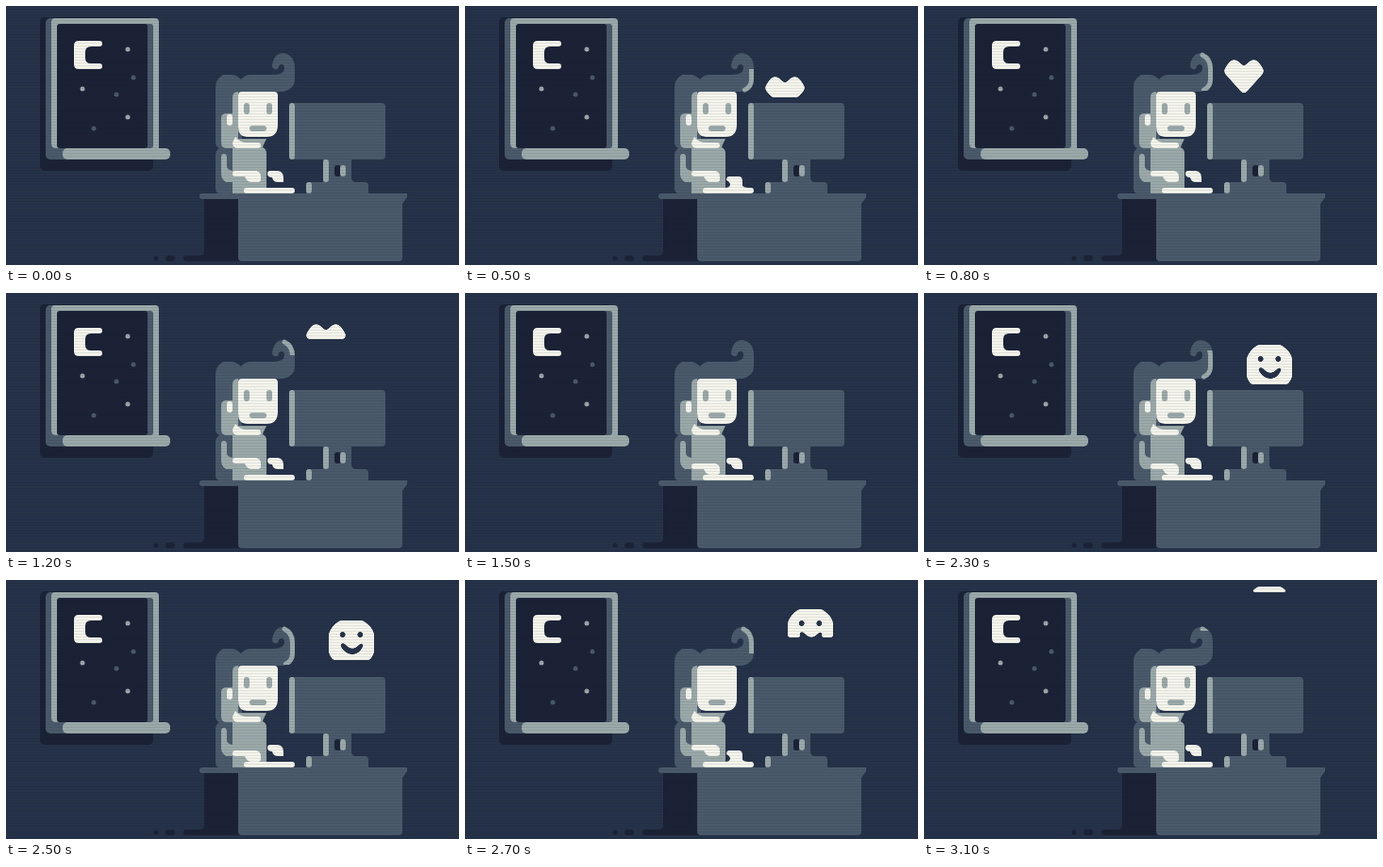
Write an HTML page that moves like this. It is 480 by 275 pixels and loops after 3200 ms.

```html
<!DOCTYPE html>
<html lang="en">
<head>
<meta charset="utf-8">
<title>Late night at the desk</title>
<style>
  html, body { margin: 0; width: 100%; height: 100%; overflow: hidden; background: #253248; }
  svg { display: block; width: 100vw; height: 100vh; }
  .dark { fill: #1b2236; }
  .mid { fill: #4a5a6b; }
  .light { fill: #9ba9a9; }
  .white { fill: #f5f5ec; }
</style>
</head>
<body>
<svg viewBox="0 0 480 275" preserveAspectRatio="none">
  <defs>
    <filter id="goo" filterUnits="userSpaceOnUse" x="300" y="0" width="110" height="110" color-interpolation-filters="sRGB">
      <feGaussianBlur stdDeviation="1.5" result="soft"/>
      <feComponentTransfer in="soft" result="edge">
        <feFuncA type="linear" slope="6" intercept="-2.5"/>
      </feComponentTransfer>
      <feFlood flood-color="#f5f5ec"/>
      <feComposite operator="in" in2="edge"/>
    </filter>
    <clipPath id="reveal"><rect id="revealBox" x="300" y="-60" width="110" height="157"/></clipPath>
    <clipPath id="glow"><rect id="glowBox" x="285" width="30" height="41"/></clipPath>
    <pattern id="lines" width="3" height="3" patternUnits="userSpaceOnUse">
      <rect width="3" height="1" fill="#10182c" opacity=".09"/>
    </pattern>
  </defs>

  <rect width="480" height="275" fill="#253248"/>

  <!-- window -->
  <rect class="dark" x="36" y="12" width="120" height="163" rx="5"/>
  <rect class="mid" x="42" y="13" width="116" height="150" rx="5"/>
  <rect class="light" x="48" y="13" width="114" height="146" rx="4"/>
  <path class="mid" d="M48 146q0 5 5 5h18v12H48z"/>
  <rect class="mid" x="140" y="19" width="16" height="132" rx="3"/>
  <rect class="dark" x="54" y="19" width="96" height="132" rx="3"/>
  <rect class="light" x="60" y="151" width="114" height="12" rx="5"/>
  <path class="white" d="M77 37H99a3 3 0 0 1 0 6H90q-6 0-6 6v6q0 6 6 6h9a3 3 0 0 1 0 6H77q-5 0-5-5V42q0-5 5-5z"/>
  <g id="stars"></g>

  <!-- desk -->
  <path class="dark" d="M210 204h40v67H191a3 3 0 0 1 0-6h14q5 0 5-5z"/>
  <rect class="dark" x="169" y="265" width="10" height="6" rx="3"/>
  <circle class="dark" cx="159" cy="268" r="2.5"/>
  <path class="mid" d="M208 199H425v4l-5 7v57q0 4-4 4H250q-4 0-4-4V205H208a3 3 0 0 1 0-6z"/>

  <!-- monitor -->
  <rect class="mid" x="300" y="103" width="102" height="60" rx="4"/>
  <rect class="light" x="300" y="103" width="6" height="60" rx="3"/>
  <path class="mid" d="M336 162h30v20q0 5 5 5h9q4 0 4 4v8H318v-8q0-4 4-4h14z"/>
  <rect class="light" x="336" y="163" width="6" height="24" rx="3"/>
  <rect class="light" x="318" y="187" width="6" height="12" rx="3"/>
  <rect class="dark" x="348" y="169" width="7" height="12" rx="3"/>
  <rect class="light" x="354" y="169" width="6" height="12" rx="3"/>

  <!-- person -->
  <path class="mid" d="M222 86q0-8 8-13h9q5 0 10 5q4-5 10-5h24q12 0 12-7q0-4-3-4q-3 0-4 5q-6 1-6-4q2-13 12-13q12 2 12 16v12q0 10-12 13H250v60q-2 20-4 48H227q-5 0-5-5V158q0-4 4-7q-4-2-4-6z"/>
  <path id="hairGlow" d="M295 52q8 4 8.5 14v12q0 8-7 11" fill="none" stroke="#9ba9a9" stroke-width="5" stroke-linecap="round" clip-path="url(#glow)"/>
  <path class="light" d="M246 91v50h30q-4 8-4 9q4 2 4 6v43H240v-12h-7q-5-3-5-9V160q0-3 3-3q3 0 3 4v9q0 4 6 5V151h-6q-6 0-6-6V119q0-5 6-5h6V97q0-6 6-6z"/>
  <path class="white" d="M250 91h34q4 0 4 4v31q0 13-12 13H255q-9 0-9-11V95q0-4 4-4z"/>
  <rect class="white" x="234" y="115" width="6" height="12" rx="3"/>
  <path class="white" d="M243 139q5 6 12 6h12a3 3 0 0 1 0 6H246q-6 0-6-6z"/>
  <g id="eyes" class="light">
    <rect x="252" y="103" width="6" height="12" rx="3"/>
    <rect x="276" y="103" width="6" height="12" rx="3"/>
  </g>
  <rect class="light" x="258" y="127" width="18" height="6" rx="3"/>
  <path id="leftArm" class="white" d="M243 175h22q5 1 5 6v3q0 3-3 3h-8q-4-1-6-6h-10a3 3 0 0 1 0-6z"/>
  <path id="handUp" class="white" d="M280 175h8q6 1 6 7v5h-6q-5 0-6-5q-5 0-5-4q0-3 3-3z"/>
  <path id="handDown" class="white" d="M280 181h10q4 0 4 5v5q2 2 6 2v4H276v-4q4 0 5-3q0-3-4-5q0-4 3-4z"/>
  <rect class="white" x="252" y="193" width="54" height="6" rx="3"/>

  <!-- reactions -->
  <g filter="url(#goo)"><g clip-path="url(#reveal)">
    <path id="heart" class="white" d="M339 7L346 1Q351-2 355 3L359 9Q361 12 359 15L342 34Q339 37 336 34L319 15Q317 12 319 9L323 3Q327-2 332 1z"/>
    <path id="smiley" class="white" fill-rule="evenodd" d="M354 0h24q10 6 12 14v20q-3 9-12 14H354q-9-5-12-14V14q3-9 12-14z
      M353.5 15a3.2 3.2 0 1 0 6.4 0a3.2 3.2 0 1 0-6.4 0z M372.1 15a3.2 3.2 0 1 0 6.4 0a3.2 3.2 0 1 0-6.4 0z
      M356 24q-3 1-1 4q5 8 12 8t11-8q2-3-1-4q-2 0-4 3q-6 6-12 0q-3-4-5-3z"/>
  </g></g>

  <rect width="480" height="275" fill="url(#lines)"/>
</svg>
<script>
  const STEP = 100, STEPS = 32, RISE = 6;
  const LEFT_DOWN = [0, 1, 1, 0, 0, 0, 1, 1];
  const RIGHT_DOWN = [0, 0, 1, 1, 0, 1, 1, 0];
  const el = id => document.getElementById(id);
  const show = (id, on) => el(id).setAttribute('visibility', on ? 'visible' : 'hidden');
  const shift = (id, y) => el(id).setAttribute('transform', `translate(0 ${y})`);

  const addStar = (x, y, tone) => {
    const star = document.createElementNS('http://www.w3.org/2000/svg', 'circle');
    Object.entries({ cx: x, cy: y, r: 2.5, class: tone }).forEach(([k, v]) => star.setAttribute(k, v));
    el('stars').append(star);
  };
  [[81, 88], [129, 46], [129, 118]].forEach(([x, y]) => addStar(x, y, 'light'));
  [[135, 76], [117, 94], [93, 130]].forEach(([x, y]) => addStar(x, y, 'mid'));

  function draw(step) {
    const phase = step % 16, isHeart = step < 16;

    // Each reaction rises from the screen, then is wiped away from below.
    show('heart', isHeart);
    show('smiley', !isHeart);
    shift(isHeart ? 'heart' : 'smiley', (isHeart ? 105 : 97) - RISE * phase);
    const cut = 97 - 2 * RISE * Math.max(0, phase - 8);
    el('revealBox').setAttribute('height', cut + 60);

    // Its light climbs the curl.
    const glow = phase + (isHeart ? 1 : 0);
    el('glowBox').setAttribute('y', 103 - RISE * glow);
    show('hairGlow', glow > 2 && glow < 16);

    const key = step % 8;
    shift('leftArm', LEFT_DOWN[key] * 6);
    show('handUp', !RIGHT_DOWN[key]);
    show('handDown', RIGHT_DOWN[key]);
    show('eyes', step !== 27);
  }

  const start = performance.now();
  function tick() {
    draw(Math.floor((performance.now() - start) / STEP) % STEPS);
    requestAnimationFrame(tick);
  }
  tick();
</script>
</body>
</html>
```
